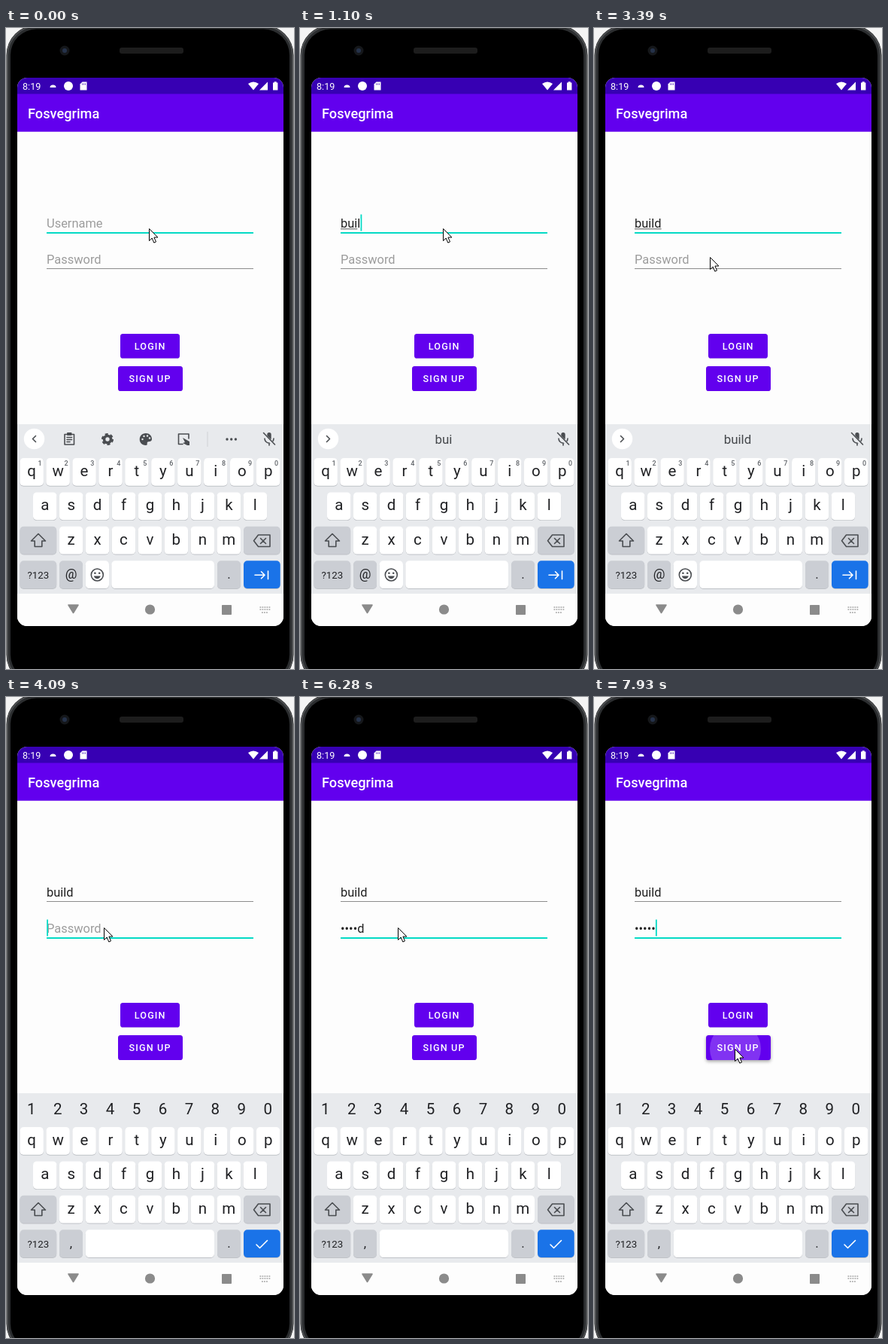
An HTML page that plays this animation: 383x851 px, repeating every 8000 ms.

```html
<!DOCTYPE html>
<html lang="en">
<head>
<meta charset="utf-8">
<title>Login form</title>
<style>
  html, body { margin: 0; width: 100%; height: 100%; overflow: hidden; background: #f4f4f4; }
  svg { display: block; width: 100vw; height: 100vh; font-family: Roboto, "Noto Sans", sans-serif; }
  .field { font-size: 16.45px; fill: #212121; white-space: pre; }
  .hint { fill: #9c9c9c; }
  .btn { font-size: 12.6px; font-weight: 500; letter-spacing: 1.125px; fill: #fff; }
  .key { font-size: 20.5px; fill: #202124; text-anchor: middle; }
  .sup { font-size: 9px; font-weight: 500; fill: #5f6368; text-anchor: middle; }
  .line { fill: none; stroke: #4a4d51; stroke-width: 1.6; stroke-linejoin: round; stroke-linecap: round; }
  .white { stroke: #fff; }
  .solid { fill: #4a4d51; }
  .teal { fill: #03dac5; }
  .rule { fill: #8c8c8c; }
  .lift { filter: drop-shadow(0 .5px .7px rgba(0, 0, 0, .22)); }
  .press { filter: drop-shadow(0 2px 2px rgba(0, 0, 0, .35)); }
</style>
</head>
<body>
<svg viewBox="0 0 383 851" preserveAspectRatio="none">
  <defs>
    <clipPath id="screen"><rect x="15" y="66" width="354" height="728" rx="13"/></clipPath>
    <clipPath id="signClip"><rect x="149" y="449" width="86" height="33" rx="3.6"/></clipPath>
  </defs>

  <!-- phone body -->
  <rect x=".5" y="-4" width="382" height="876" rx="40" fill="#1b1c1d"/>
  <rect x="2" y="-2.500" width="379" height="873" rx="38.500" fill="#2b2d2f" stroke="#4c4e50" stroke-width="2"/>
  <rect x="6" y="1.500" width="371" height="865" rx="34.500" fill="#000"/>
  <rect x="151" y="26" width="85" height="8" rx="3" fill="#1d1d1d"/>
  <circle cx="78" cy="30" r="6.5" fill="#15171a"/>
  <circle cx="78" cy="30" r="3" fill="#25324a"/>

  <g clip-path="url(#screen)">
    <rect x="15" y="66" width="354" height="728" fill="#fdfdfd"/>
    <rect x="15" y="66" width="354" height="22" fill="#3700b3"/>
    <rect x="15" y="87.5" width="354" height="50.2" fill="#6200ee"/>

    <!-- status bar -->
    <g fill="#fff">
      <text x="22" y="81.5" font-size="12.6">8:19</text>
      <path d="M58.500 79a4 3.600 0 0 1 8 0z"/>
      <circle cx="83" cy="77" r="6"/>
      <path d="M101.500 71.500h6v11h-9v-8z"/>
      <path d="M322 74q7-5 14 0l-7 8.500z"/>
      <path d="M348 71.500v11h-11z"/>
      <path d="M355 72.500h1.700v-1.200h3v1.200h1.700v10h-6.400z"/>
    </g>
    <path d="M101.500 73.500v2M103.500 73.500v2M105.500 73.500v2" stroke="#3700b3" stroke-width=".8"/>
    <text x="29" y="120" font-size="18.2" font-weight="500" fill="#fff">Fosvegrima</text>

    <!-- form -->
    <text class="field hint" id="userHint" x="54" y="265">Username</text>
    <text class="field" id="user" x="54" y="265"></text>
    <rect id="under" x="54" y="266.300" height="1" fill="#555"/>
    <rect id="userLine" x="54" width="275"/>
    <rect class="teal" id="userCaret" y="247.500" width="1.800" height="22"/>
    <text class="field hint" id="passHint" x="54" y="313">Password</text>
    <text class="field" id="pass" x="54" y="313"></text>
    <rect id="passLine" x="54" width="275"/>
    <rect class="teal" id="passCaret" y="295.500" width="1.800" height="22"/>

    <rect class="lift" x="152" y="406" width="79" height="32.500" rx="3.600" fill="#6200ee"/>
    <text class="btn" x="170.800" y="427">LOGIN</text>
    <rect class="lift" id="sign" x="149" y="449" width="86" height="33" rx="3.600" fill="#6200ee"/>
    <circle id="ripple" cx="188" cy="467" r="34" fill="#fff" opacity=".2" clip-path="url(#signClip)"/>
    <text class="btn" x="163.600" y="470.300">SIGN UP</text>

    <!-- keyboard -->
    <rect x="15" y="526" width="354" height="225" fill="#e8eaed"/>
    <g id="keys"></g>
    <path class="line" d="M43 671.500l9.500 9.500h-4.700v7.500h-9.600v-7.500h-4.700z"/>
    <path class="line" d="M335.500 673h15.500v15.500h-15.500l-6-7.750zM338.500 677.500l7 7m0-7l-7 7"/>

    <g id="textKeys">
      <g id="sups"></g>
      <circle cx="37.500" cy="545.500" r="13.700" fill="#fff"/>
      <path class="line" id="chevron"/>
      <rect class="solid" x="347.300" y="537" width="5.400" height="10.500" rx="2.700"/>
      <path class="line" d="M344 545a6 6 0 0 0 12 0M350 551v3"/>
      <path d="M342 539l15 15" stroke="#e8eaed" stroke-width="4"/>
      <path class="line" d="M342.500 537.500l15 15.500"/>
      <g id="tools">
        <path class="line" d="M78 539.500h12.500v13.500h-12.500zM81 543.500h6.500M81 546.500h6.500M81 549.500h4"/>
        <rect class="solid" x="81" y="537" width="6.500" height="4" rx="1"/>
        <circle class="solid" cx="135" cy="546" r="6.300"/>
        <circle cx="135" cy="546" r="6.800" fill="none" stroke="#4a4d51" stroke-width="2.500" stroke-dasharray="4 3.120"/>
        <circle cx="135" cy="546" r="2.700" fill="#e8eaed"/>
        <path class="solid" d="M186 538c-11 0-11 16 0 16 3 0 1-3 2-4 1-1.500 6 0 6-4.500 0-4-3.500-7.500-8-7.500z"/>
        <g fill="#e8eaed">
          <circle cx="181.500" cy="546" r="1.200"/><circle cx="183.500" cy="542" r="1.200"/>
          <circle cx="188" cy="541.500" r="1.200"/><circle cx="191" cy="544.500" r="1.200"/>
        </g>
        <path class="line" d="M235 552.500h-5.500v-13.500h13.500v6"/>
        <path class="solid" d="M235 544l3 6-3 1 6 3h3v-5z"/>
        <path d="M268 536v20" stroke="#cfd1d5"/>
        <g class="solid">
          <circle cx="294" cy="546" r="1.700"/><circle cx="299.700" cy="546" r="1.700"/><circle cx="305.400" cy="546" r="1.700"/>
        </g>
      </g>
      <text id="suggest" x="191" y="552" font-size="16.900" fill="#45484c" text-anchor="middle"></text>
      <circle class="line" cx="121.300" cy="726" r="8"/>
      <circle class="solid" cx="118.400" cy="723.700" r="1.300"/><circle class="solid" cx="124.200" cy="723.700" r="1.300"/>
      <path class="solid" d="M116.800 727.500h9q-1.300 3.800-4.500 3.800t-4.500-3.800z"/>
      <path class="line white" d="M331 726.300h13m-4.500-4.500l4.500 4.500-4.500 4.500M348.500 721v10.600"/>
    </g>
    <g id="passKeys">
      <g id="digits"></g>
      <path class="line white" d="M333 727l4.500 4.500 10-10"/>
    </g>

    <!-- navigation bar -->
    <rect x="15" y="751" width="354" height="43" fill="#fdfdfd"/>
    <g fill="#8b8b8b">
      <path d="M83 766h13l-6.500 10.500z" stroke="#8b8b8b" stroke-width="1.600" stroke-linejoin="round"/>
      <circle cx="191.500" cy="772" r="6.600"/>
      <rect x="287" y="766" width="13" height="13" rx=".8"/>
      <path d="M337.500 769h14M337.500 772h14M340 776h9" fill="none" stroke="#a2a2a2" stroke-width="1.700" stroke-dasharray="1.800 1.200"/>
    </g>
  </g>

  <path id="mouse" d="M0 0v16l3.700-3.500 2.600 6.100 2.700-1.200-2.600-5.900h5z" fill="#fff" stroke="#000" stroke-linejoin="round"/>
</svg>

<script>
const LOOP = 8000, NAME = "build", PITCH = 34.95;
const ROWS = [571, 616.4, 661.8, 707.3];
const $ = id => document.getElementById(id);

function add(parent, tag, attrs, text) {
  const el = document.createElementNS("http://www.w3.org/2000/svg", tag);
  for (const k in attrs) el.setAttribute(k, attrs[k]);
  if (text) el.textContent = text;
  parent.appendChild(el);
}

function key(parent, x, r, w, label, fill = "#fff", size = 20.5) {
  const y = ROWS[r], box = { x, width: w, height: 36.8, rx: 5 };
  add(parent, "rect", { ...box, y: y + .9, fill: "#bfc2c7" });
  add(parent, "rect", { ...box, y, fill });
  if (label) add(parent, "text", { class: "key", x: x + w / 2, y: y + 23.9, style: `font-size:${size}px` }, label);
}

function row(letters, x, r) {
  [...letters].forEach((c, i) => key($("keys"), x + i * PITCH, r, 31.5, c));
}

const GREY = "#cbced4", BLUE = "#1a73e8";
row("qwertyuiop", 18.4, 0);
row("asdfghjkl", 36, 1);
row("zxcvbnm", 70.8, 2);
key($("keys"), 18.5, 2, 48.7, "", GREY);
key($("keys"), 316, 2, 48.7, "", GREY);
key($("keys"), 18.5, 3, 48.7, "?123", GREY, 13.3);
key($("keys"), 281, 3, 31, ".", GREY, 17);
key($("keys"), 316, 3, 48.7, "", BLUE);
[..."1234567890"].forEach((c, i) => {
  add($("sups"), "text", { class: "sup", x: 45 + i * PITCH, y: 581 }, c);
  add($("digits"), "text", { class: "key", x: 33.7 + i * PITCH, y: 554 }, c);
});

// The lower-row keys go beneath the icons of their layout.
function lowerKeys(group, list) {
  const g = document.createElementNS("http://www.w3.org/2000/svg", "g");
  list.forEach(k => key(g, ...k));
  group.prepend(g);
}
lowerKeys($("textKeys"), [[71, 3, 31, "@", GREY, 17.5], [105.8, 3, 31.2], [140.3, 3, 136.7]]);
lowerKeys($("passKeys"), [[71, 3, 31, ",", GREY, 17], [105.8, 3, 171.2]]);

// Step tracks: [time, value...]
const typed = [[0, 0], [570, 1], [710, 2], [860, 3], [1100, 4], [1350, 5]];
const known = [[0, 0], [710, 1], [860, 2], [1100, 3], [1350, 4], [1600, 5]];
const secret = [[0, ""], [5240, "w"], [5360, "•o"], [5490, "•••l"], [5780, "••••d"], [7130, "•••••"]];
const userBlink = [[0, 0], [570, 1], [2130, 0], [2560, 1], [3120, 0], [3540, 1], [4090, 0]];
const passBlink = [[0, 0], [3810, 1], [4590, 0], [5090, 1], [6280, 0], [6770, 1], [7130, 0], [7650, 1]];
const path = [
  [0, 190.5, 266.5], [3240, 182.5, 277.5], [3390, 154.5, 304.5], [3540, 141.5, 306.5], [3660, 130.5, 306.5],
  [6530, 131.5, 322.5], [6650, 134.5, 366.5], [6770, 140.5, 417.5], [6890, 146.5, 452.5], [7010, 148.5, 469.5],
  [7130, 167.5, 470.5], [7280, 187.5, 467.5]
];

const step = (track, t) => track.findLast(s => s[0] <= t);
const at = (track, t) => step(track, t)[1];
const show = (id, on) => { $(id).style.display = on ? "" : "none"; };

function setText(id, text) {
  if ($(id).textContent !== text) $(id).textContent = text;
}

function setLine(id, y, active) {
  const el = $(id);
  el.setAttribute("class", active ? "teal" : "rule");
  el.setAttribute("y", y);
  el.setAttribute("height", active ? 2 : 1);
}

function setCaret(id, field, on) {
  show(id, on);
  const w = field.textContent ? field.getComputedTextLength() : 0;
  $(id).setAttribute("x", 54.2 + w);
}

function draw(t) {
  const n = at(typed, t), k = at(known, t), code = at(secret, t);
  const passMode = t >= 4090, tools = t < 980, pressed = t >= 7930;

  setText("user", NAME.slice(0, n));
  show("userHint", !n);
  show("under", k && !passMode);
  if (k) $("under").setAttribute("width", $("user").getSubStringLength(0, k));
  setLine("userLine", 271, !passMode);
  setCaret("userCaret", $("user"), at(userBlink, t));

  setText("pass", code);
  show("passHint", !code);
  setLine("passLine", 319, t >= 3810);
  setCaret("passCaret", $("pass"), at(passBlink, t));

  show("textKeys", !passMode);
  show("passKeys", passMode);
  show("tools", tools);
  setText("suggest", tools ? "" : NAME.slice(0, k));
  $("chevron").setAttribute("d", tools ? "M39.5 541.500l-4 4 4 4" : "M35.500 541.500l4 4-4 4");

  show("ripple", pressed);
  $("sign").setAttribute("class", pressed ? "press" : "lift");
  const [, x, y] = step(path, t);
  $("mouse").setAttribute("transform", `translate(${x} ${y})`);
}

const start = performance.now();
function frame() {
  draw((performance.now() - start) % LOOP);
  requestAnimationFrame(frame);
}
frame();
</script>
</body>
</html>
```
